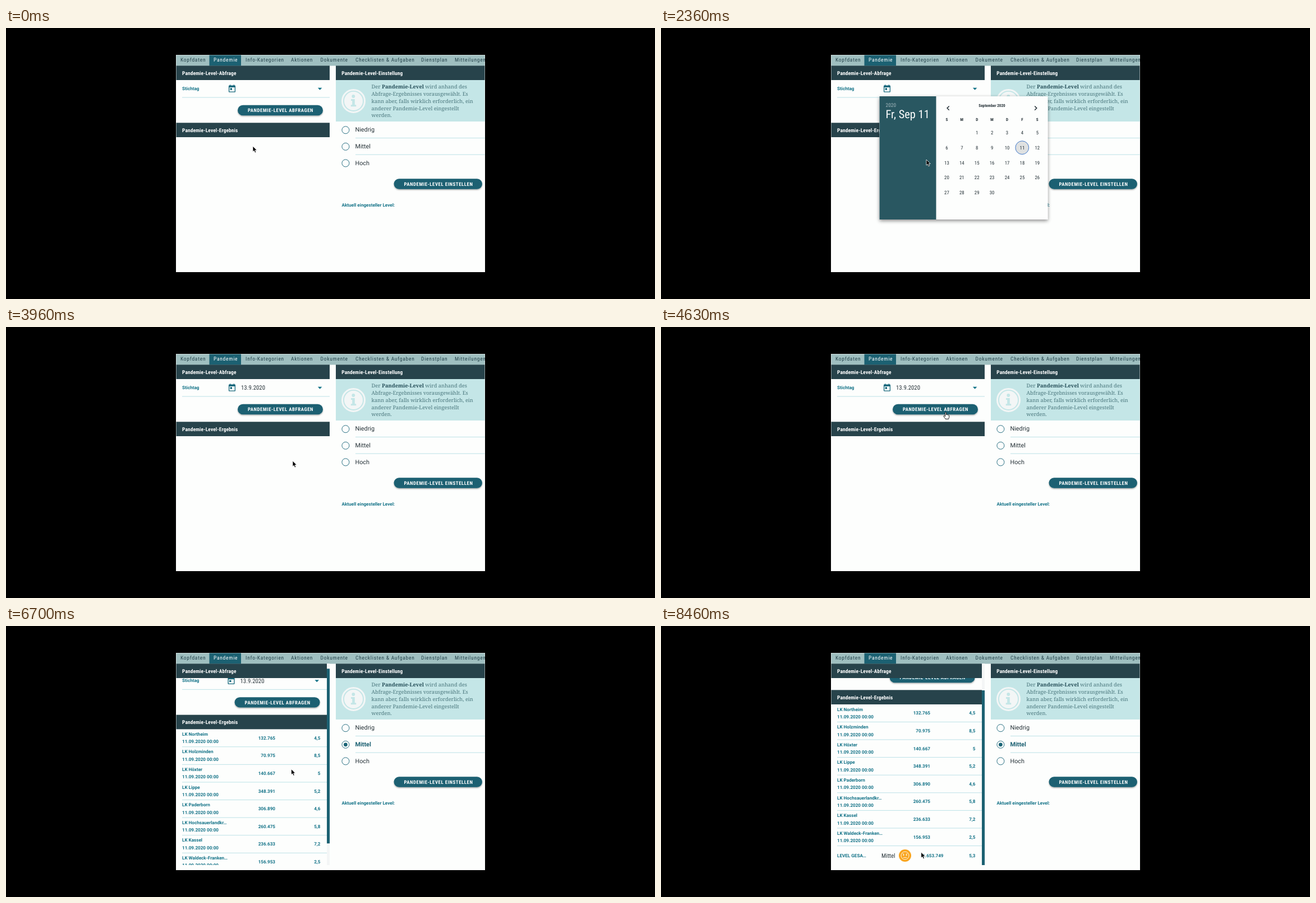
These frames come from a looping animation (1157x484 px, 8500 ms). An HTML page:

```html
<!DOCTYPE html>
<html lang="de">
<head>
<meta charset="utf-8">
<title>Pandemie-Level</title>
<style>
html, body { margin: 0; width: 100%; height: 100%; overflow: hidden; background: #000; }
svg { display: block; width: 1157px; height: 484px; }
text { font-family: Roboto, sans-serif; fill: #147388; white-space: pre; text-rendering: geometricPrecision; }
.cond { font-family: "Roboto Condensed", Roboto, sans-serif; font-stretch: 75%; }
.tab { font-size: 9.5px; letter-spacing: .75px; fill: #26444c; }
.active { fill: #fff; }
.head { font-size: 9.4px; font-weight: 700; letter-spacing: .12px; fill: #fff; }
.btn { font-size: 8.9px; font-weight: 700; letter-spacing: .52px; fill: #fff; }
.small { font-size: 8.15px; font-weight: 700; }
.body { font-size: 10.8px; fill: #263238; }
.bold { font-weight: 700; fill: #1b6072; }
.info { font-family: "Roboto Slab", "Noto Serif", serif; font-size: 9.26px; font-weight: 300; fill: #4a777d; }
.info tspan { font-weight: 700; fill: #27505a; }
.year { font-size: 9.4px; fill: #a4b8bd; }
.date { font-size: 20.4px; fill: #fff; }
.day { font-size: 8.8px; fill: #263238; text-anchor: middle; }
.week { font-size: 7.2px; font-weight: 700; fill: #263238; text-anchor: middle; }
.end { text-anchor: end; }
</style>
</head>
<body>
<svg id="stage" viewBox="0 0 1157 484"></svg>
<script>
const LOOP = 8500;
const TEAL = '#1c6172', DARK = '#27434b', LINE = '#bce2e7', PAPER = '#fdfefd', INK = '#263238';
const CAL = 'M19 3h-1V1h-2v2H8V1H6v2H5c-1.1 0-2 .9-2 2v14c0 1.1.9 2 2 2h14c1.1 0 2-.9 2-2V5c0-1.1-.9-2-2-2zm0 16H5V8h14v11zM7 10h5v5H7z';

const text = (x, y, s, cls, more = '') => `<text x="${x}" y="${y}" class="${cls}" ${more}>${s}</text>`;
const rect = (x, y, w, h, fill, more = '') => `<rect x="${x}" y="${y}" width="${w}" height="${h}" fill="${fill}" ${more}/>`;
const disc = (x, y, r, fill, more = '') => `<circle cx="${x}" cy="${y}" r="${r}" fill="${fill}" ${more}/>`;
const path = (d, fill, more = '') => `<path d="${d}" fill="${fill}" ${more}/>`;
const group = (id, s) => `<g id="${id}">${s}</g>`;
const rule = (x, y, end) => rect(x, y, end - x, 1, LINE);
const button = (x, y, w, s) =>
  rect(x, y, w, 18.4, TEAL, 'rx="9.2" filter="url(#low)"') + text(x + 18, y + 12.4, s, 'cond btn');

const tabs = [[311, 'Kopfdaten'], [370, 'Pandemie'], [427, 'Info-Kategorien'], [508, 'Aktionen'],
  [560.5, 'Dokumente'], [623, 'Checklisten &amp; Aufgaben'], [740, 'Dienstplan'], [800, 'Mitteilungen']];

const rows = [['Northeim', '132.765', '4,5'], ['Holzminden', '70.975', '8,5'], ['Höxter', '140.667', '5'],
  ['Lippe', '348.391', '5,2'], ['Paderborn', '306.890', '4,6'], ['Hochsauerlandkr…', '260.475', '5,8'],
  ['Kassel', '236.633', '7,2'], ['Waldeck-Franken…', '156.953', '2,5']];

function tabBar() {
  return rect(303.5, 48.5, 550, 19, '#9fbfc0') + rect(362.5, 48.5, 56.5, 19, TEAL) +
    tabs.map(([x, s], i) => text(x, 60.2, s, 'cond tab' + (i === 1 ? ' active' : ''))).join('');
}

function results() {
  const list = rows.map(([name, people, rate], i) => {
    const y = 195 + i * 31.6;
    return text(314, y + 11.5, 'LK ' + name, 'small') + text(314, y + 24.9, '11.09.2020 00:00', 'small') +
      text(480, y + 18.4, people, 'small end') + text(560.5, y + 18.4, rate, 'small end') +
      rule(314, y + 30.9, 572);
  }).join('');
  const face = disc(435, 465, 11, '#f9a51f') +
    path('M431.8 468.4h6.4M430.8 461.6l2.6 1M439.2 461.6l-2.6 1', 'none', 'stroke="#fff" stroke-width=".9"') +
    disc(435, 465, 7, 'none', 'stroke="#fff" stroke-width=".9"') +
    disc(432.4, 464.2, 1, '#fff') + disc(437.6, 464.2, 1, '#fff');
  return list + text(314, 468, 'LEVEL GESA…', 'small') + text(393, 468.6, 'Mittel', 'cond body') + face +
    text(503.5, 468, '1.653.749', 'small end') + text(560.5, 468, '5,3', 'small end');
}

function leftSide() {
  const form = text(314, 111, 'Stichtag', 'small') + rule(314, 123.5, 577) +
    group('date', disc(403, 108, 13.3, '#e4e6e6', 'id="ripple"') +
      path(CAL, '#17687c', 'transform="translate(394.9 100.6) scale(.674)"') +
      text(419, 112.2, '13.9.2020', 'cond body', 'id="value"')) +
    group('right', path('M555.8 106.8h7.6l-3.8 4z', '#147388') + button(413, 137.8, 152, 'PANDEMIE-LEVEL ABFRAGEN')) +
    rect(303.5, 169.3, 273.5, 25.7, DARK) + text(314, 185.6, 'Pandemie-Level-Ergebnis', 'cond head');
  const bar = rect(572, 67, 5.3, 360, '#f4f6f6') + rect(572, 67, 5.3, 312, TEAL, 'id="thumb"');
  return '<g clip-path="url(#pane)">' + group('scroll', form + group('results', results())) +
    rect(303.5, 67.3, 273.5, 25.7, DARK) + text(314, 83.5, 'Pandemie-Level-Abfrage', 'cond head') +
    group('bar', bar) + '</g>';
}

function rightSide() {
  const lines = ['Der <tspan>Pandemie-Level</tspan> wird anhand des', 'Abfrage-Ergebnisses vorausgewählt. Es',
    'kann aber, falls wirklich erforderlich, ein', 'anderer Pandemie-Level eingestellt', 'werden.'];
  const icon = disc(619.5, 130.4, 20, 'none', 'stroke="#f3f6f6" stroke-width="3"') + disc(619.5, 130.4, 16.6, '#f3f6f6') +
    disc(619.3, 122, 2.9, '#c4e6e7') + path('M615 127h6.8v10.2h2.4v3h-9.4v-3h2.4v-7.2H615z', '#c4e6e7');
  const radios = ['Niedrig', 'Mittel', 'Hoch'].map((s, i) => {
    const y = 182.2 + i * 29.6;
    return disc(605.4, y, 6.5, 'none', 'stroke="#2a7083"') +
      text(622.5, y + 3.2, s, 'body', `id="opt${i}"`) + (i < 2 ? rule(623, y + 13.8, 853.5) : '');
  }).join('');
  return rect(588, 67.3, 265.5, 25.7, DARK) + text(598.3, 83.5, 'Pandemie-Level-Einstellung', 'cond head') +
    rect(588, 93, 265.5, 74, '#c4e6e7') + icon +
    lines.map((s, i) => text(651.6, 108.4 + i * 12.75, s, 'info')).join('') +
    radios + disc(605.4, 211.8, 3.4, '#1b6476', 'id="dot"') +
    button(691.5, 269.3, 157.5, 'PANDEMIE-LEVEL EINSTELLEN') +
    text(598.5, 318.8, 'Aktuell eingesteller Level:', 'small');
}

function picker() {
  const col = i => 509.4 + i * 26.9;
  let days = '';
  for (let d = 1; d <= 30; d++) {
    const n = d + 1;
    days += text(col(n % 7), 189.9 + Math.floor(n / 7) * 26.85, d, 'cond day');
  }
  return rect(389.5, 122, 300, 220, PAPER, 'filter="url(#high)"') + rect(389.5, 122, 101, 220, '#295761') +
    text(400.5, 141.3, '2020', 'cond year') + text(400.5, 161.3, 'Fr, Sep 11', 'cond date') +
    text(590, 141.4, 'September 2020', 'cond week') +
    path('M513.7 139.5l-3.6 3.6 3.6 3.6M666.2 139.5l3.6 3.6-3.6 3.6', 'none', `stroke="${INK}" stroke-width="1.5"`) +
    [...'SMDMDFS'].map((s, i) => text(col(i), 166, s, 'cond week')).join('') +
    disc(509.4, 240.4, 12, '#f2f3f3', 'id="hover"') +
    disc(643.8, 213.7, 11.9, '#dfe1e1', 'stroke="#3f78c9"') + days;
}

const arrow = path('M0 0v10.2l2.3-2.1 1.6 3.7 1.9-.8-1.6-3.6h3.1z', '#000', 'stroke="#fff" stroke-width=".8"');
const hand = path('M-1 .8c0-1.3 1.9-1.3 1.9 0v3.6c.5-.7 1.7-.5 1.8.3.6-.5 1.6-.3 1.7.5.7-.4 1.6 0 1.6.9v2.7c0 1-.8 1.6-.9 3.2H-.6c-.2-1.5-2.2-2.8-3.2-4.7-.5-1 .7-1.7 1.5-.9l1.3 1.2z',
  '#fff', 'stroke="#000" stroke-width=".9" stroke-linejoin="round"');

document.getElementById('stage').innerHTML = `<defs>
  <clipPath id="page"><rect x="303" y="48" width="551" height="388"/></clipPath>
  <clipPath id="pane"><rect x="303" y="67" width="274.3" height="360"/></clipPath>
  <filter id="low" x="-10%" y="-30%" width="120%" height="180%"><feDropShadow dx="0" dy="1.4" stdDeviation="1.2" flood-opacity=".35"/></filter>
  <filter id="high" x="-10%" y="-10%" width="120%" height="125%"><feDropShadow dx="0" dy="2.5" stdDeviation="3.2" flood-opacity=".45"/></filter>
  </defs><g clip-path="url(#page)">` + rect(303, 48, 551, 388, PAPER) + tabBar() + leftSide() + rightSide() +
  group('picker', picker()) + '</g>' + group('cursor', group('arrow', arrow) + group('hand', hand));

const $ = id => document.getElementById(id);
const show = (id, on) => $(id).style.display = on ? '' : 'none';
const move = (id, x, y) => $(id).setAttribute('transform', `translate(${x} ${y})`);
const part = (t, a, b) => Math.min(1, Math.max(0, (t - a) / (b - a)));
const ease = p => p * p * (3 - 2 * p);

// pointer stops: start, end, x, y
const moves = [[0, 0, 440, 211], [430, 1000, 399.6, 103], [1130, 1300, 402, 107.5], [1900, 2360, 473, 235],
  [2360, 2760, 510, 239], [2770, 2830, 511, 239.5], [3930, 4730, 507.5, 148.5], [6000, 6360, 508.5, 255.5],
  [7200, 7800, 437, 404], [8270, 8460, 463.7, 404]];

function pointer(t) {
  let [, , x, y] = moves[0];
  for (const [a, b, nx, ny] of moves) {
    if (t <= a) break;
    const p = ease(part(t, a, b));
    x += (nx - x) * p;
    y += (ny - y) * p;
  }
  return [x, y];
}

function draw(t) {
  const [x, y] = pointer(t);
  const open = t >= 1600 && t < 3560, done = t >= 5530;
  const onCell = open && Math.hypot(x - 509.4, y - 240.4) < 12;
  const onButton = t < 6700 && x > 413 && x < 565 && y > 138 && y < 156;
  const pointing = onCell && t < 3460 || onButton;
  move('cursor', x, y);
  show('hand', pointing);
  show('arrow', !pointing);

  show('picker', open);
  $('picker').style.opacity = 1 - part(t, 3430, 3560);
  show('hover', onCell);
  show('ripple', t >= 1460 && t < 1600);
  $('ripple').setAttribute('r', 13.3 * part(t, 1400, 1520));
  show('value', t >= 3460);

  show('results', done);
  show('bar', done);
  move('date', done ? -1.5 : 0, 0);
  move('right', done ? -5.4 : 0, 0);
  $('opt1').classList.toggle('bold', done);
  $('dot').setAttribute('r', 3.4 * ease(part(t, 5550, 5830)));

  const s = 55 * part(t, 6670, 6830);
  move('scroll', 0, -s);
  move('thumb', 0, s * 48 / 55);
}

function tick() {
  draw(performance.now() % LOOP);
  requestAnimationFrame(tick);
}
tick();
</script>
</body>
</html>
```
